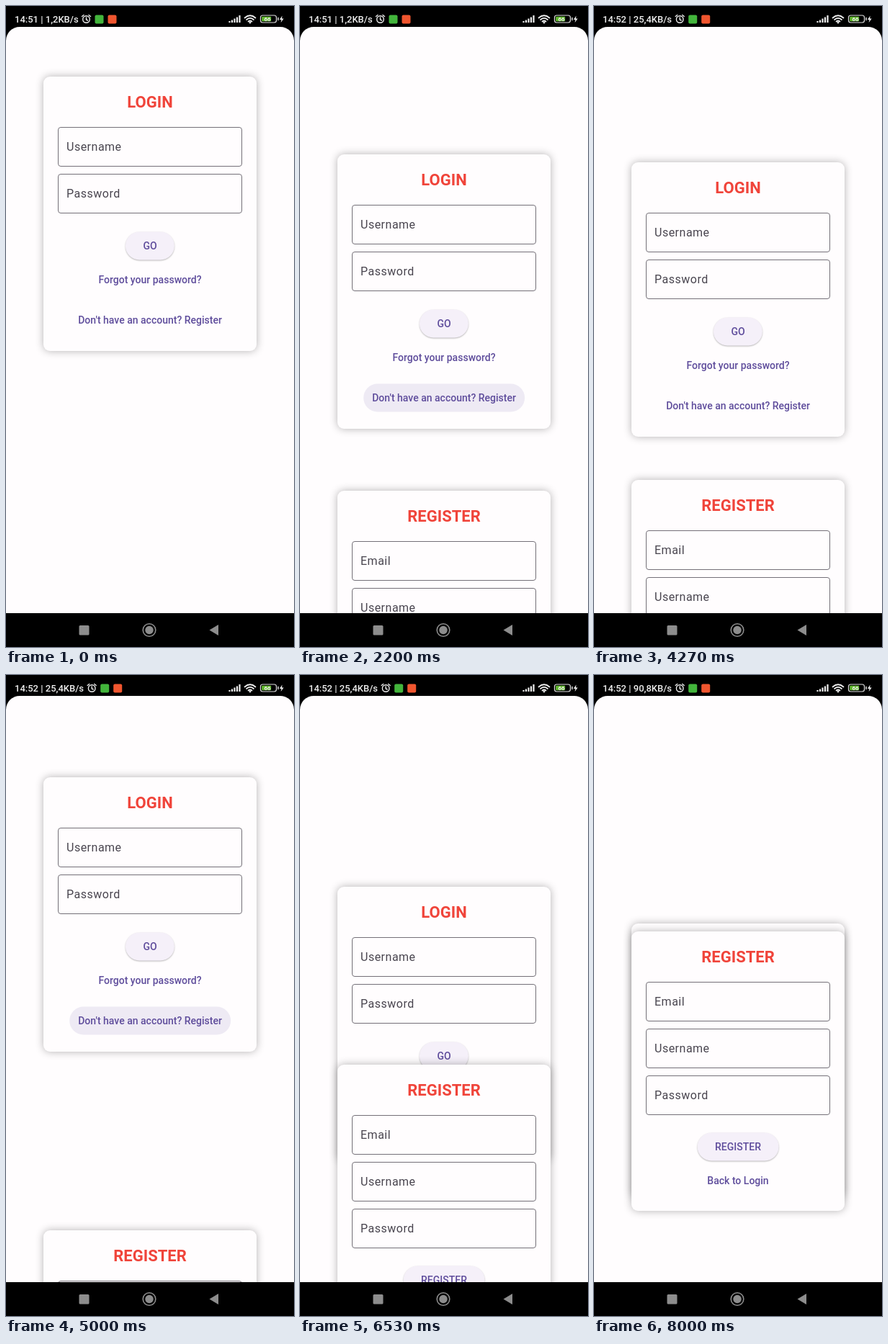
Write an HTML page that moves like this. It is 400 px wide and 890 px high and loops after 8070 ms.

```html
<!DOCTYPE html>
<html lang="en">
<head>
<meta charset="utf-8">
<title>Login and register cards</title>
<style>
  html, body { margin: 0; width: 100%; height: 100%; overflow: hidden; background: #000; }
  body { position: relative; font-family: Roboto, "Open Sans", sans-serif; }
  #page {
    position: absolute; left: 0; top: 29px; width: 400px; height: 814px;
    overflow: hidden; background: #fffdfe; border-radius: 19px 19px 0 0;
  }
  .card {
    position: absolute; left: 52px; top: -29px; width: 296px;
    background: #fffdfe; border-radius: 9px; box-shadow: 0 0 12px rgba(0, 0, 0, .3);
  }
  #login { height: 381px; }
  #register { height: 388px; }
  .card > * { position: absolute; box-sizing: border-box; white-space: nowrap; }
  .title, .link, .button { left: 50%; transform: translate(-50%, -50%); }
  .title { top: 35px; font-size: 22px; font-weight: 700; color: #f0443a; }
  .field {
    left: 20px; width: 256px; height: 55px; padding-left: 11px;
    border: 1px solid #747078; border-radius: 4px;
    font-size: 16px; line-height: 53px; letter-spacing: .5px; color: #49454f;
  }
  .link, .button {
    height: 39px; padding: 0 12px; border-radius: 20px;
    font-size: 14px; font-weight: 500; line-height: 39px; color: #5f4d9c;
  }
  .button { padding: 0 24.5px; background: #f5f0f9; box-shadow: 0 1px 2px rgba(0, 0, 0, .28); }
  svg { position: absolute; left: 0; top: 0; }
</style>
</head>
<body>
<div id="page">
  <div class="card" id="login">
    <div class="title">LOGIN</div>
    <div class="field" style="top:70px">Username</div>
    <div class="field" style="top:135px">Password</div>
    <div class="button" style="top:234.5px">GO</div>
    <div class="link" style="top:281.5px">Forgot your password?</div>
    <div class="link" id="toRegister" style="top:337.5px">Don't have an account? Register</div>
  </div>
  <div class="card" id="register">
    <div class="title">REGISTER</div>
    <div class="field" style="top:70px">Email</div>
    <div class="field" style="top:135px">Username</div>
    <div class="field" style="top:200px">Password</div>
    <div class="button" style="top:298.5px">REGISTER</div>
    <div class="link" id="toLogin" style="top:345.5px">Back to Login</div>
  </div>
</div>

<svg width="400" height="890" viewBox="0 0 400 890" fill="none" stroke-linecap="round">
  <text id="status" x="12" y="23" font-size="13" font-weight="500" fill="#eee"></text>
  <g id="icons">
    <g stroke="#eee" stroke-width="1.4">
      <circle cx="111.5" cy="18.5" r="4.8"/>
      <path d="M111.5 16v3l2 1M105.5 14.5l2.5-2M117.5 14.5l-2.5-2"/>
    </g>
    <rect x="123.5" y="12.5" width="12" height="12" rx="2" fill="#43b53c"/>
    <rect x="141.5" y="12.5" width="12" height="12" rx="2" fill="#f0562f"/>
  </g>
  <path d="M310.5 21v2M314 19.5v3.5M317.5 17.5v5.500M321 15.500v7.500M324.500 13v10" stroke="#eee" stroke-width="2.200" stroke-linecap="butt"/>
  <g stroke="#eee" stroke-width="1.7">
    <path d="M331.5 16.5q7.5-6.5 15 0M334 19q5-4.2 10 0M336.5 21.5q2.5-2 5 0"/>
    <circle cx="339" cy="23" r=".6"/>
  </g>
  <rect x="353.5" y="13" width="22" height="10" rx="3" stroke="#ddd" stroke-width="1.2"/>
  <rect x="355.2" y="14.7" width="13" height="6.6" rx="1" fill="#62b92f"/>
  <path d="M378 16.5v3" stroke="#ddd" stroke-width="1.5"/>
  <text x="363" y="20.8" font-size="8" font-weight="700" text-anchor="middle" fill="#eee">66</text>
  <path d="M383.5 13.5l-3.5 5.500h2.500l-.8 4 4-5.500h-2.500z" fill="#eee"/>
  <g fill="#8d8d8d">
    <rect x="101.5" y="860" width="14" height="13.5" rx="1.5"/>
    <circle cx="199" cy="866.5" r="5.7"/>
    <circle cx="199" cy="866.5" r="8.8" fill="none" stroke="#8d8d8d" stroke-width="1.6"/>
    <path d="M282.5 866.5l12.5-7.5v15z"/>
  </g>
</svg>

<script>
const LOOP = 8070, SLIDE = 800;
const $ = id => document.getElementById(id);
const clamp = x => Math.min(1, Math.max(0, x));

// Start time of each slide and the side it goes to (1 = register)
const slides = [[1900, 1], [3796, 0], [4853, 1], [6240, 0], [7110, 1]];
const registerTaps = [1890, 4800, 7070];
const loginTaps = [3670, 6170];
const statuses = [
  [0, "14:51 | 1,2KB/s"], [2500, "14:51 | 25,4KB/s"],
  [4000, "14:52 | 25,4KB/s"], [6900, "14:52 | 90,8KB/s"]
];

const latest = (list, t) => list.filter(item => item[0] <= t).pop();

function slidePosition(t) {
  const slide = latest(slides, t);
  if (!slide) return 0;
  const k = clamp((t - slide[0]) / SLIDE);
  return slide[1] ? k : 1 - k;
}

// Whole pixels keep the thin outlines crisp
function moveTo(id, y) {
  $(id).style.transform = `translateY(${Math.round(y)}px)`;
}

function highlight(id, taps, t) {
  const glow = Math.max(...taps.map(tap =>
    Math.min(clamp((t - tap) / 80), clamp((tap + 720 - t) / 300))));
  $(id).style.background = `rgba(103, 80, 164, ${0.11 * glow})`;
}

function draw(now) {
  const t = now % LOOP;
  const u = slidePosition(t);
  const ease = Math.min(1, u * (0.674 + u * (1.899 - 1.573 * u)));
  moveTo("login", 98 + 247 * ease);
  moveTo("register", 865 - 509 * u);
  highlight("toRegister", registerTaps, t);
  highlight("toLogin", loginTaps, t);

  const text = latest(statuses, t)[1];
  $("status").textContent = text;
  $("icons").setAttribute("transform", `translate(${text.length > 15 ? 7.7 : 0} 0)`);
  requestAnimationFrame(draw);
}
draw(performance.now());
</script>
</body>
</html>
```
